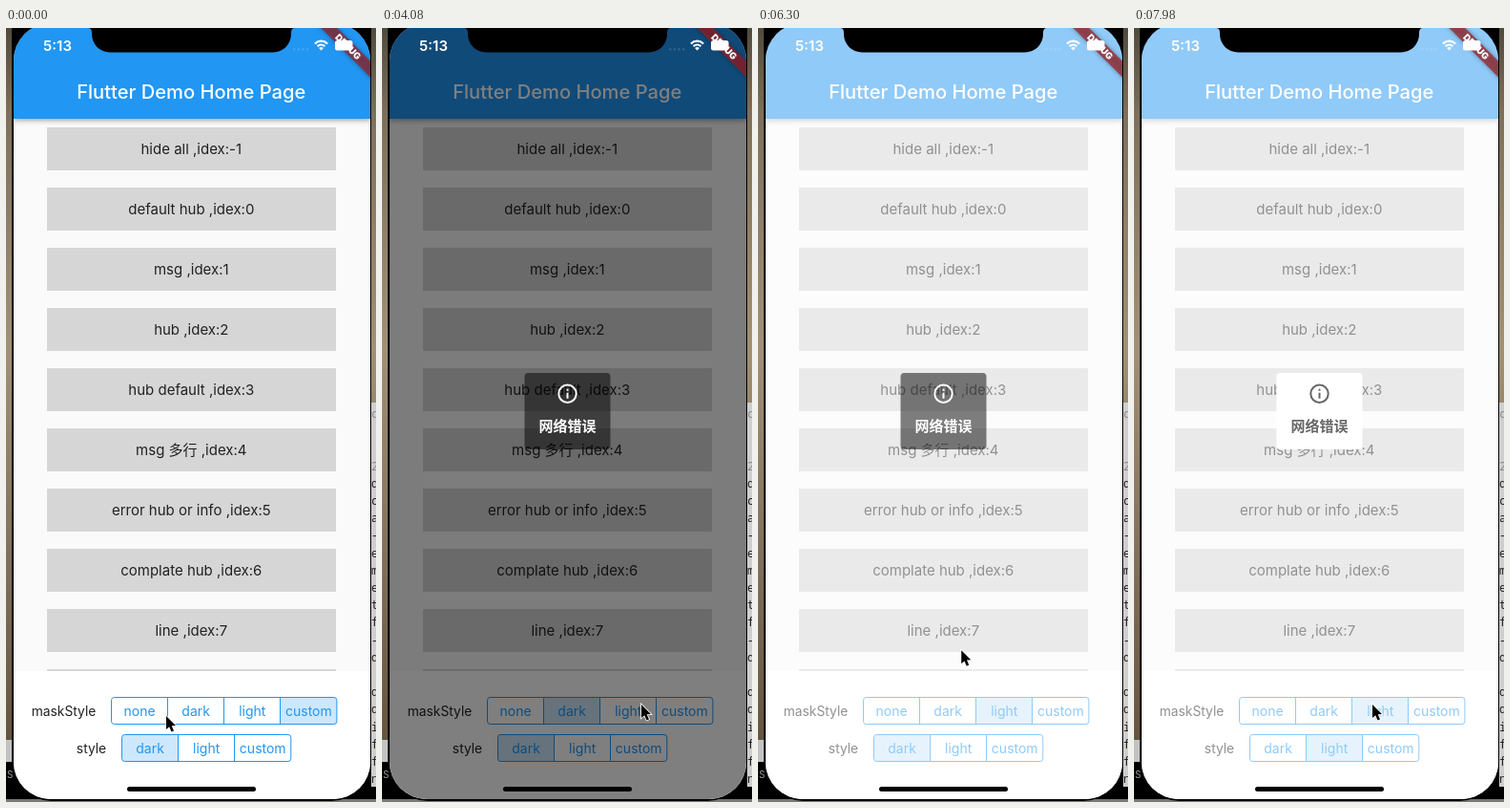
Write an HTML page with a canvas that moves like this. It is 388 px wide and 810 px high and loops after 8000 ms.

```html
<!DOCTYPE html>
<html lang="en">
<head>
<meta charset="utf-8">
<title>Toast demo</title>
<style>
html, body { margin: 0; width: 100%; height: 100%; overflow: hidden; background: #000; }
canvas { display: block; width: 388px; height: 810px; }
</style>
</head>
<body>
<canvas id="stage"></canvas>
<script>
const W = 388, H = 810, LOOP = 8000;
const canvas = document.getElementById('stage');
const ctx = canvas.getContext('2d');
const ratio = window.devicePixelRatio || 1;
canvas.width = W * ratio;
canvas.height = H * ratio;

const SANS = 'Inter, "Noto Sans CJK SC", "Noto Sans CJK", "Noto Sans", sans-serif';
const BLUE = '#2196f3', INK = '#222';
const ROWS = ['hide all ,idex:-1', 'default hub ,idex:0', 'msg ,idex:1', 'hub ,idex:2',
  'hub default ,idex:3', 'msg 多行 ,idex:4', 'error hub or info ,idex:5',
  'complate hub ,idex:6', 'line ,idex:7'];
const MASKS = ['none', 'dark', 'light', 'custom'];
const STYLES = ['dark', 'light', 'custom'];

// Pointer stops: time, x, y
const PATH = [[0, 168, 720], [350, 168, 720], [1000, 173, 506], [1500, 173, 506],
  [2200, 204, 712], [2450, 204, 712], [2900, 208, 505], [3250, 208, 505],
  [3950, 272, 708], [4600, 272, 708], [5080, 215, 514], [6050, 215, 514],
  [6500, 212, 748], [6680, 212, 748], [6900, 216, 531], [7000, 216, 512],
  [7300, 216, 512], [7850, 250, 708], [8000, 250, 708]];
const MASK_PICKS = [[0, 3], [200, 0], [2350, 1], [4500, 2]];
const STYLE_PICKS = [[0, 0], [6640, 1]];
const TAPS = [1200, 2980, 5150, 7050];
const STEP = 700;

const clamp = v => Math.max(0, Math.min(1, v));
const latest = (list, t) => list.filter(p => p[0] <= t).pop()[1];

function rect(x, y, w, h, color) {
  ctx.fillStyle = color;
  ctx.fillRect(x, y, w, h);
}

function round(x, y, w, h, r, color) {
  ctx.beginPath();
  ctx.roundRect(x, y, w, h, r);
  if (color) { ctx.fillStyle = color; ctx.fill(); }
}

function text(s, x, y, size, color, weight = 400, align = 'center', family = SANS) {
  ctx.font = `${weight} ${size}px ${family}`;
  ctx.textAlign = align;
  ctx.textBaseline = 'alphabetic';
  ctx.fillStyle = color;
  ctx.fillText(s, x, y);
}

function line(points, color, width) {
  ctx.beginPath();
  points.forEach(([x, y], i) => i ? ctx.lineTo(x, y) : ctx.moveTo(x, y));
  ctx.strokeStyle = color;
  ctx.lineWidth = width;
  ctx.stroke();
}

function desktop() {
  const tan = ctx.createLinearGradient(0, 0, 0, 745);
  tan.addColorStop(0, '#514a3c');
  tan.addColorStop(0.12, '#7d705a');
  tan.addColorStop(0.45, '#a19074');
  tan.addColorStop(1, '#65553f');
  rect(0, 0, W, H, '#000');
  rect(0, 0, 6, 745, tan);
  rect(0, 745, 6, 23, '#c2c2c2');
  text('S', 1, 785, 10, '#999', 400, 'left');
  rect(383, 0, 5, 392, tan);
  rect(383, 392, 5, 402, '#cecece');
  'c  2dca-emetf-d ddiffn'.split('').forEach((c, i) =>
    text(c, 383, 408 + i * 18.2, 12, i < 4 ? '#888' : '#222', 400, 'left',
      '"Noto Sans Mono", monospace'));
  rect(0, 807, W, 3, '#777');
}

function segments(x, y, labels, chosen) {
  const w = 59.1, full = w * labels.length, h = 28;
  ctx.save();
  round(x, y, full, h, 3);
  ctx.clip();
  rect(x, y, full, h, '#fff');
  rect(x + chosen * w, y, w, h, '#cde7fc');
  ctx.restore();
  labels.forEach((label, i) => {
    if (i) {
      const edge = Math.round(x + i * w - 0.5) + 0.5;
      line([[edge, y], [edge, y + h]], BLUE, 1);
    }
    text(label, x + (i + 0.5) * w, y + 19.5, 14, BLUE);
  });
  round(x, y, full, h, 3);
  ctx.strokeStyle = BLUE;
  ctx.lineWidth = 1;
  ctx.stroke();
}

function ripple(t) {
  const age = t - TAPS[0] + 40;
  if (age < 0 || age > 420) return;
  ctx.save();
  ctx.beginPath();
  ctx.rect(8, 473, 374, 65);
  ctx.clip();
  ctx.beginPath();
  ctx.arc(173.5, 505, 20 + age * 0.286, 0, Math.PI * 2);
  ctx.fillStyle = `rgba(0,0,0,${0.055 * (1 - clamp((age - 240) / 180))})`;
  ctx.fill();
  ctx.restore();
}

function page(t) {
  rect(8, 0, 374, H, '#fafafa');
  ROWS.forEach((label, i) => {
    const y = 104 + i * 63;
    rect(43, y, 303, 45, '#d6d6d6');
    text(label, 194.3, y + 28, 15, INK);
  });
  rect(43, 671, 303, 2, '#d6d6d6');
  ripple(t);
  rect(8, 673, 374, 134, '#fff');

  ctx.save();
  ctx.shadowColor = 'rgba(0,0,0,.32)';
  ctx.shadowBlur = 5 * ratio;
  ctx.shadowOffsetY = 2 * ratio;
  rect(8, -10, 374, 105, BLUE);
  ctx.restore();
  text('Flutter Demo Home Page', 194.2, 74, 20.15, '#fff', 500);

  text('maskStyle', 60.5, 720, 13.8, INK);
  segments(110.5, 700.5, MASKS, latest(MASK_PICKS, t));
  text('style', 89.5, 759, 13.8, INK);
  segments(121.5, 739.5, STYLES, latest(STYLE_PICKS, t));
}

function toast(t) {
  const start = TAPS.filter(v => v <= t).pop();
  const age = t - start;
  if (start === undefined || age >= STEP * 2) return;

  const mask = MASKS[latest(MASK_PICKS, start)];
  const light = STYLES[latest(STYLE_PICKS, start)] === 'light';
  if (mask !== 'none') {
    const tone = mask === 'dark' ? 0 : 255;
    rect(8, 0, 374, H, `rgba(${tone},${tone},${tone},${0.5 * clamp((age - 40) / 100)})`);
  }

  const failed = age < STEP;
  const ink = light ? '#666' : '#fff';
  const top = failed ? 355.5 : 361;
  round(149.5, top, 90, failed ? 91 : 80, 4, light ? '#fff' : 'rgba(0,0,0,.5)');
  if (failed) {
    line([[188.3, 374.8], [200.7, 387.2]], ink, 2);
    line([[200.7, 374.8], [188.3, 387.2]], ink, 2);
  } else {
    ctx.beginPath();
    ctx.arc(194.5, 382.7, 9.2, 0, Math.PI * 2);
    ctx.strokeStyle = ink;
    ctx.lineWidth = 2;
    ctx.stroke();
    rect(193.5, 381.7, 2, 6, ink);
    rect(193.5, 377.7, 2, 2, ink);
  }
  text('网络错误', 194.5, failed ? 427.3 : 422.3, 15, ink, 900, 'center',
    '"Noto Sans CJK SC", "Noto Sans CJK", sans-serif');
}

function banner() {
  ctx.save();
  ctx.translate(382, -5);
  ctx.rotate(Math.PI / 4);
  ctx.shadowColor = 'rgba(0,0,0,.5)';
  ctx.shadowBlur = 5 * ratio;
  rect(-60, 28, 120, 12, 'rgba(160,28,32,.68)');
  ctx.shadowColor = 'transparent';
  text('DEBUG', 1, 37.2, 9.6, '#fff', 900);
  ctx.restore();
}

function statusBar() {
  text('5:13', 54, 23.5, 15, '#fff', 600);
  for (let i = 0; i < 4; i++) round(301 + i * 4.6, 21, 2.5, 2.5, 1, 'rgba(255,255,255,.14)');
  ctx.lineWidth = 2.2;
  ctx.strokeStyle = '#fff';
  [5.5, 9.3].forEach(r => {
    ctx.beginPath();
    ctx.arc(330.5, 23, r, -Math.PI * 0.75, -Math.PI * 0.25);
    ctx.stroke();
  });
  ctx.beginPath();
  ctx.moveTo(330.5, 23.5);
  ctx.arc(330.5, 23.5, 3.4, -Math.PI * 0.75, -Math.PI * 0.25);
  ctx.fillStyle = '#fff';
  ctx.fill();
  round(345, 13, 18.5, 10.5, 2.5, '#fff');
}

function notch() {
  ctx.beginPath();
  ctx.moveTo(86, 0);
  ctx.quadraticCurveTo(90, 0, 90, 5);
  ctx.arcTo(90, 25.5, 110, 25.5, 19);
  ctx.arcTo(299, 25.5, 299, 5, 19);
  ctx.lineTo(299, 5);
  ctx.quadraticCurveTo(299, 0, 303, 0);
  ctx.fillStyle = '#000';
  ctx.fill();
}

function pointer(t) {
  const i = Math.max(1, PATH.findIndex(p => p[0] > t));
  const [a, b] = [PATH[i - 1], PATH[i]];
  const k = clamp((t - a[0]) / (b[0] - a[0]));
  const e = k * k * (3 - 2 * k);
  ctx.save();
  ctx.translate(a[1] + (b[1] - a[1]) * e, a[2] + (b[2] - a[2]) * e);
  ctx.beginPath();
  [[0, 0], [0, 14], [3.2, 11.2], [5.5, 16.5], [8, 15.4], [5.7, 10.2], [10, 10]]
    .forEach(([x, y]) => ctx.lineTo(x, y));
  ctx.closePath();
  ctx.lineWidth = 1.6;
  ctx.strokeStyle = '#fff';
  ctx.stroke();
  ctx.fillStyle = '#000';
  ctx.fill();
  ctx.restore();
}

function draw(t) {
  ctx.setTransform(ratio, 0, 0, ratio, 0, 0);
  desktop();
  round(6, -8, 377, 817, 42, '#000');
  ctx.save();
  round(8, -5, 374, 812, 39);
  ctx.clip();
  page(t);
  toast(t);
  banner();
  statusBar();
  round(127, 794, 135, 5, 2.5, '#000');
  ctx.restore();
  notch();
  pointer(t);
}

const begin = performance.now();
function tick() {
  draw((performance.now() - begin) % LOOP);
  requestAnimationFrame(tick);
}
tick();
</script>
</body>
</html>
```
